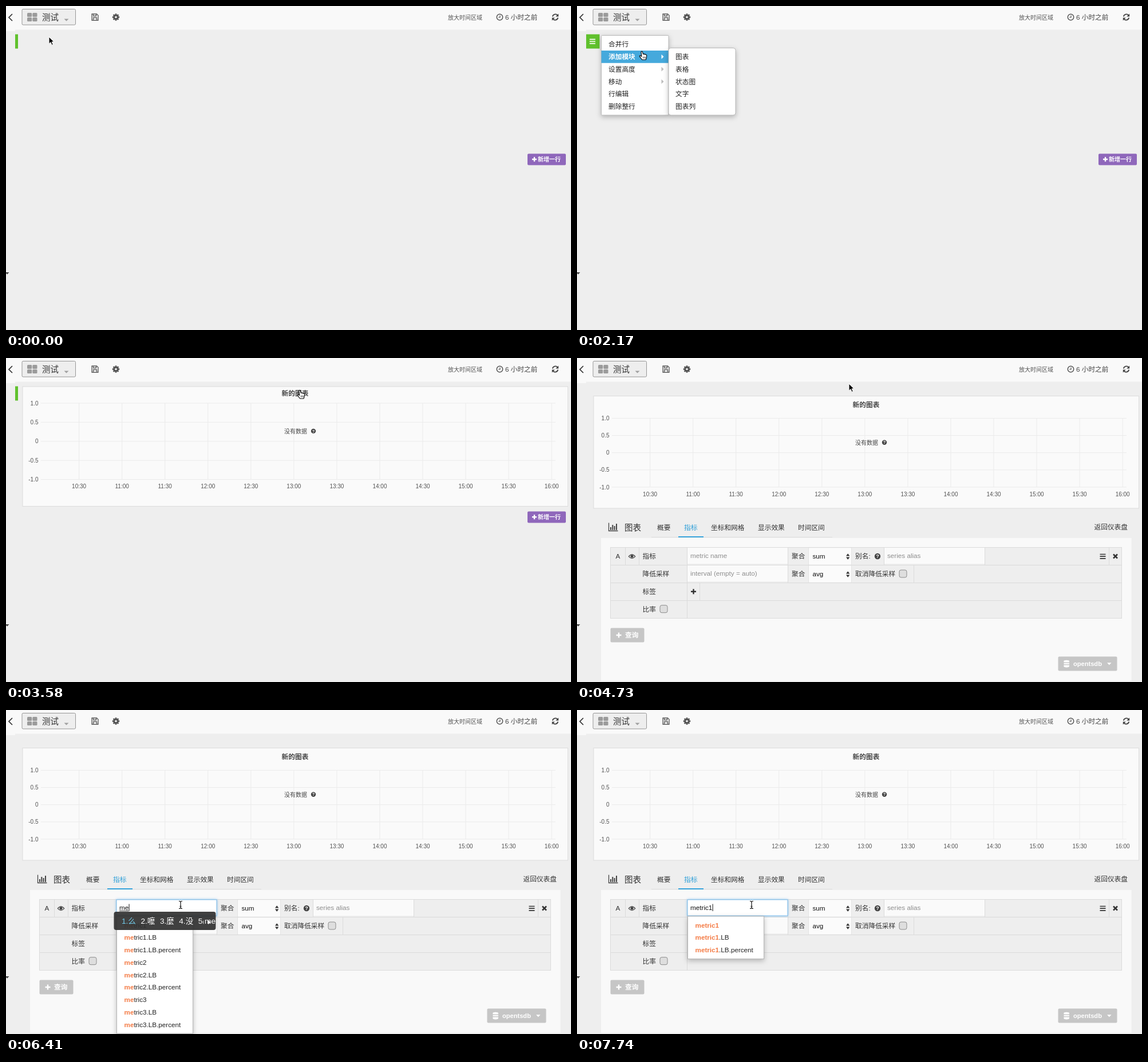
These frames come from a looping animation (987 px wide and 567 px high, 8 s). An HTML page:

```html
<!DOCTYPE html>
<html lang="zh-CN">
<head>
<meta charset="utf-8">
<title>Dashboard</title>
<style>
html, body { margin: 0; width: 100%; height: 100%; overflow: hidden; background: #eee; }
svg { display: block; width: 100%; height: 100%; }
text { font: 11.7px "Liberation Sans", "Noto Sans CJK SC", "Noto Sans CJK", sans-serif; fill: #333; white-space: pre; }
.pop { filter: drop-shadow(0 3px 4px rgba(0, 0, 0, .25)); }
</style>
</head>
<body>
<svg id="stage" viewBox="0 0 987 567"></svg>
<script>
const LOOP = 8000, ROW = 21.75;
const stage = document.getElementById('stage');

// Markup helpers
const rect = (x, y, w, h, fill, extra = '') =>
  `<rect x="${x}" y="${y}" width="${w}" height="${h}" fill="${fill}" ${extra}/>`;
const text = (x, y, s, style = '', extra = '') =>
  `<text x="${x}" y="${y}" style="${style}" ${extra}>${s}</text>`;
const path = (d, fill, extra = '') => `<path d="${d}" fill="${fill}" ${extra}/>`;
const line = (d, stroke, w = 1, extra = '') =>
  path(d, 'none', `stroke="${stroke}" stroke-width="${w}" ${extra}`);
const group = (id, body, extra = '') => `<g id="${id}" ${extra}>${body}</g>`;
const at = (x, y, body) => `<g transform="translate(${x} ${y})">${body}</g>`;
const plus = (x, y, color, r = 4) =>
  line(`M${x - r} ${y}h${2 * r}M${x} ${y - r}v${2 * r}`, color, 2.4);
const bars = (x, y, w, color) =>
  line(`M${x} ${y}h${w}m${-w} 3.7h${w}m${-w} 3.7h${w}`, color, 1.7);
const help = (x, y, r) => `<circle cx="${x}" cy="${y}" r="${r}" fill="#444"/>` +
  text(x, y + r * .62, '?', `font-size:${r * 1.75}px;font-weight:bold;fill:#fff`, 'text-anchor="middle"');
const box = (x, y) => rect(x, y, 13, 13, '#dedede', 'rx="3" stroke="#8c8c8c"');

function header() {
  const teeth = [...Array(8)].map((_, i) =>
    rect(-1.4, -6.2, 2.8, 4, '#555', `transform="rotate(${i * 45})"`)).join('');
  const tiles = [0, 1, 2, 3].map(i =>
    rect(37 + i % 2 * 9.3, 12 + (i >> 1) * 8, 8.2, 7, '#9b9b9b', 'rx="1.5"')).join('');
  return rect(0, 0, 987, 41.5, '#f9f9f9') + rect(0, 0, 16, 44, '#f9f9f9') +
    line('M11 14L5 20L11 26', '#333', 1.7) +
    rect(28, 5.5, 93.5, 27.5, '#eee', 'rx="2" stroke="#969696"') + tiles +
    text(63, 25, '测试', 'font-size:14.5px;font-weight:500') +
    path('M101.5 22.5h8l-4 4z', '#a0a0a0') +
    line('M150 14h8.5l2.5 2.5v8.5h-11zM152.5 14v3.5h5v-3.5M152.5 25v-4.5h6v4.5', '#555', 1.3) +
    at(192, 19.5, teeth + '<circle r="3.2" fill="none" stroke="#555" stroke-width="2.8"/>') +
    text(772, 23.5, '放大时间区域', 'font-size:10px;fill:#555') +
    '<circle cx="862.5" cy="19.5" r="5.2" fill="none" stroke="#555" stroke-width="1.5"/>' +
    line('M863 16.5v3.5h-2.8', '#555', 1.2) +
    text(872, 24, '6 小时之前', 'fill:#444') +
    line('M954.8 18.5a5 5 0 0 1 8.7-2.3M964.2 20.5a5 5 0 0 1-8.7 2.3', '#444', 1.8) +
    path('M965.2 13.5v5h-5zM953.8 25.5v-5h5z', '#444') +
    path('M-1 466h6.5l-3.5 3.8z', '#444');
}

function chart(id, top, bottom, titleY, gridY, step, timeY, emptyY) {
  let s = rect(29, top, 952.5, bottom - top, '#fafafa', 'class="panel" stroke="#dcdcdc"');
  s += text(505, titleY, '新的图表', 'font-weight:bold;fill:#444', 'text-anchor="middle"');
  ['1.0', '0.5', '0', '-0.5', '-1.0'].forEach((v, i) => {
    const y = gridY + i * step;
    s += line(`M61 ${y}H960`, '#ebebeb') +
      text(56.5, y + 3.6, v, 'font-size:10px;fill:#545454', 'text-anchor="end"');
  });
  for (let i = 0; i < 12; i++) {
    const x = 127.6 + i * 75.05, min = 630 + i * 30;
    s += line(`M${x} ${gridY}v${step * 4}`, '#ebebeb') +
      text(x, timeY, `${Math.floor(min / 60)}:${min % 60 ? '30' : '00'}`, 'font-size:10px;fill:#545454', 'text-anchor="middle"');
  }
  s += text(486, emptyY, '没有数据', 'font-size:10px;fill:#444') + help(537, emptyY - 3.7, 4.2);
  return group(id, s);
}

function menu(x, y, w, h, tx, items, cls, rx) {
  return rect(x, y, w, h, '#fff', `rx="${rx}" stroke="#b9b9b9" class="pop"`) +
    items.map((s, i) => {
      const arrow = cls === 'item' && i > 0 && i < 4;
      return `<g class="${cls}">` + rect(x, 78 + (i - (cls === 'item')) * ROW, w, ROW, 'none') +
        text(tx, 93 + (i - (cls === 'item')) * ROW, s) +
        (arrow ? path(`M147.5 ${84.7 + (i - 1) * ROW}l4 4l-4 4z`, '#bbb', 'class="arrow"') : '') + '</g>';
    }).join('');
}

function panelMenu() {
  const names = ['查看', '编辑', '复制', '分享'];
  return rect(424, 5, 162, 51, '#fbfbfb', 'stroke="#d0d0d0" class="pop"') +
    line('M424 30.5h162', '#ddd') +
    line('M440 18h9M472 18h9m-4.5-4.5v9M529 14l7 8m0-8l-7 8', '#555', 1.8) + bars(560, 14.3, 10, '#555') +
    names.map((s, i) => rect(425 + i * 40.3, 31, 39, 25, 'none', 'class="act"') +
      text(444.5 + i * 40.3, 47.5, s, '', 'text-anchor="middle"')).join('');
}

function editor() {
  const tabs = [['概要', 140], ['指标', 187], ['坐标和网格', 234], ['显示效果', 316], ['时间区间', 386]];
  const input = (x, y, s, id = '') => rect(x, y, 175, 28, '#fafafa', id && `id="${id}"`) +
    text(x + 5, y + 17.5, s, 'fill:#8e8e8e', id && 'id="hint"');
  const select = (y, s) => rect(405, y, 74, 29, '#fbfbfb') + text(411.5, y + 18.5, s, 'fill:#111') +
    path(`M470 ${y + 14}h6.4l-3.2-4.3zM470 ${y + 16}h6.4l-3.2 4.3z`, '#333');
  const button = (x, y, w) => rect(x, y, w, 25, '#c6c6c6', 'rx="2"');
  return line('M55.5 288.5V302.5H71.5', '#444', 1.3) +
    line('M59 301v-5M62.3 301v-9M65.6 301v-7M69 301v-11', '#444', 2) +
    text(83, 302, '图表', 'font-size:14.5px') +
    tabs.map(([s, x], i) => text(x, 301, s, i === 1 ? 'fill:#2f9fd8' : '')).join('') +
    line('M130 313.5H446', '#ddd') + rect(177, 312, 44, 2, '#38a4dc') +
    text(903.5, 300, '返回仪表盘') +
    rect(42, 315, 926.5, 250, '#f9f9f9') +
    rect(58.5, 331.5, 893, 124, '#eee', 'stroke="#dbdbdb"') +
    line('M59 362.5H951M59 393.5H951M59 424.5H951M192.5 332V455M84.5 332v30M108.5 332v30' +
      'M368.5 332v61M405 332v61M479 332v61M536.5 332v30M712.5 332v30M929.5 332v30M588.5 363v30M214.5 394v30', '#dbdbdb') +
    text(67.5, 351, 'A') +
    line('M90.3 347.3q5.7-7 11.4 0q-5.7 6.5-11.4 0z', '#444', 1.2) + '<circle cx="96" cy="347" r="2.5" fill="#444"/>' +
    ['指标', '降低采样', '标签', '比率'].map((s, i) => text(114.5, 351.3 + i * 31, s)).join('') +
    input(193, 332, 'metric name', 'field') + input(193, 363, 'interval (empty = auto)') + input(537, 332, 'series alias') +
    text(375, 351.3, '聚合') + text(375, 382.3, '聚合') + select(332.5, 'sum') + select(363.5, 'avg') +
    text(486, 351.3, '别名:') + help(525, 347, 5.2) +
    text(486, 382.3, '取消降低采样') + box(563, 371) + box(145, 432.7) +
    bars(913.5, 343.5, 10, '#333') + line('M937 343.5l7 7m0-7l-7 7', '#333', 2.5) +
    plus(203.5, 408.8, '#333', 4.5) +
    button(58.5, 472.5, 59) + plus(73, 485, '#fff', 4.5) + text(84, 489.3, '查询', 'fill:#fff;font-weight:bold') +
    button(840.5, 522.5, 103) +
    line('M850.5 531.5h9.5M850.5 535h9.5M850.5 538.5h9.5', '#fff', 2.2) +
    '<ellipse cx="855.2" cy="530.5" rx="4.8" ry="1.8" fill="#fff"/><ellipse cx="855.2" cy="539.6" rx="4.8" ry="1.8" fill="#fff"/>' +
    text(867, 539, 'opentsdb', 'fill:#fff;font-weight:bold;font-size:11.1px') +
    path('M926 533.3h7.5l-3.7 4z', '#fff');
}

const cursors = {
  arrow: path('M0 0V12.3L3 9.6L5.1 14.4L7.3 13.4L5.2 8.8H9Z', '#000', 'stroke="#fff"'),
  hand: path('M-1.2 1Q0-.6 1.2 1L2.2 5.2Q3.6 4.2 4.6 5.6Q6.2 4.8 7 6.3Q8.6 6 8.6 8L8 12L7 15H0.6L-3.6 9.6Q-4.6 7.6-2.8 7.8L-.4 9.4Z',
    '#fff', 'stroke="#000" stroke-width="1.1" stroke-linejoin="round"') + line('M2.4 9.6v3M4.3 9.6v3M6.2 9.6v3', '#000', .7),
  beam: line('M-3-6.5Q0-6.5 0-4.5Q0-6.5 3-6.5M0-5V5M-3 6.5Q0 6.5 0 4.5Q0 6.5 3 6.5M-1.5 2.5h3', '#111', 1.2)
};

stage.innerHTML = rect(0, 0, 987, 567, '#eee') + header() +
  group('tab', rect(16, 49.5, 5, 25, '#60c12d', 'id="green"') + group('burger', bars(22, 58.3, 10, '#fff'))) +
  group('add', rect(911, 0, 67, 20, '#8f67bb', 'rx="2"') + plus(923, 9.7, '#fff') +
    text(929, 13.5, '新增一行', 'font-size:10px;font-weight:bold;fill:#fff')) +
  chart('small', 50, 259.5, 66.2, 79, 33.4, 228.4, 131.6) +
  chart('large', 66.5, 263, 86.2, 105.5, 30.1, 242, 151.5) +
  group('editor', editor()) +
  group('rowMenu', menu(42.5, 51.5, 117.5, 139.5, 55, ['合并行', '添加模块', '设置高度', '移动', '行编辑', '删除整行'], 'item', 1)) +
  group('subMenu', menu(160, 73.5, 117, 117.5, 172, ['图表', '表格', '状态图', '文字', '图表列'], 'sub', 4)) +
  group('panelMenu', panelMenu()) +
  group('list', '') + group('typed', '') + group('ime', '') + group('cursor', '');

const $ = id => document.getElementById(id);
const show = (id, on) => { $(id).style.display = on ? '' : 'none'; };

// The screen refreshes only in these bursts: first, last, count
const bursts = [[0, 0, 1], [720, 720, 1], [860, 1380, 7], [1640, 1640, 1], [1820, 2610, 10], [2960, 3580, 8],
  [3930, 3930, 1], [4110, 4380, 4], [4730, 4820, 2], [4970, 5150, 3], [5420, 5600, 3], [5870, 6050, 3],
  [6230, 7020, 10], [7200, 7290, 2], [7650, 7740, 2]];

function snap(t) {
  t += 4;
  const [a, b, n] = bursts.findLast(s => s[0] <= t);
  if (n === 1) return a;
  const step = (b - a) / (n - 1);
  return a + Math.min(n - 1, Math.floor((t - a) / step)) * step;
}

const track = [[0, 75, 54], [720, 60, 56], [1120, 18, 59], [1380, 26, 61], [1640, 26, 61], [1820, 50, 72],
  [2170, 113, 79], [2610, 182, 84], [2960, 190, 86], [3580, 513, 56], [3930, 513, 56], [4200, 485, 35],
  [4380, 476, 45], [4730, 475, 45], [4820, 378, 268], [5150, 305, 368], [5420, 305, 361], [5600, 305, 341]];
const shapes = [[0, 'arrow'], [1030, 'hand'], [2950, 'arrow'], [3480, 'hand'], [4720, 'arrow'], [5050, 'beam']];
const keys = [6230, 6400, 6575, 6660, 6750, 6925, 7640];
const words = ['没 吗 么 嘛 们', '么 嚒 麼 没 me', '么他 met 么特 么 麼', '么头 metr 么 麼 嚒', 'metric 么提 met 么 麼', 'metric 么提出 met 么 麼'];

const last = (list, t) => list.findLast(k => k[0] <= t);

function pointer(t) {
  const i = track.findLastIndex(k => k[0] <= t), a = track[i], b = track[i + 1] || a;
  const f = b === a ? 0 : (t - a[0]) / (b[0] - a[0]);
  return [a[1] + (b[1] - a[1]) * f, a[2] + (b[2] - a[2]) * f];
}

function highlight(cls, index) {
  stage.querySelectorAll('.' + cls).forEach((g, i) => {
    const on = i === index, label = g.querySelector('text'), arrow = g.querySelector('.arrow');
    g.firstChild.setAttribute('fill', on ? '#45a9dc' : 'none');
    label.style.fill = on ? '#fff' : '#222';
    label.style.fontWeight = on ? 'bold' : 'normal';
    if (arrow) arrow.setAttribute('fill', on ? '#fff' : '#bbb');
  });
}

function suggestions(word) {
  const all = word
    ? ['metric1', 'metric2', 'metric3'].flatMap(m => ['', '.LB', '.LB.percent'].map(e => m + e)).filter(s => s.startsWith(word))
    : ['SystemHealth', ...['batchCount', 'byteSize', 'runningTime', 'state'].map(s => 'collector.' + s),
      ...['idle', 'irq', 'nice', 'state', 'user'].map(s => 'cpu.' + s)];
  const w = word ? 133 : 226, h = 9.3 + all.length * ROW;
  return rect(193.5, 361, w, h, '#fff', 'stroke="#b5b5b5" class="pop"') +
    all.map((s, i) => text(206.5, 380.7 + i * ROW,
      `<tspan style="font-weight:bold;fill:#f47b45">${word}</tspan>${s.slice(word.length)}`, 'fill:#222')).join('') +
    (word ? '' : rect(412.5, 361.5, 6.5, 42, '#fafafa', 'stroke="#8c8c8c"'));
}

function drawTyped(word, composing, focused) {
  if (!focused) return $('typed').innerHTML = '';
  $('typed').innerHTML = text(198, 349.8, word, 'fill:#111');
  const w = word ? $('typed').firstChild.getComputedTextLength() : 0;
  $('typed').innerHTML += line(`M${198.8 + w} 339.5v12.5`, '#111') +
    (composing ? line(`M198 351.7h${w}`, '#222') : '');
}

function drawIme(n) {
  if (!n) return $('ime').innerHTML = '';
  const spans = words[n - 1].split(' ').map((s, i) =>
    `<tspan dx="${i ? 8.5 : 0}" fill="${i ? '#fff' : '#72cbea'}" style="fill:${i ? '#fff' : '#72cbea'}">${i + 1}.${s}</tspan>`).join('');
  $('ime').innerHTML = text(202, 374, spans, 'font-size:13.6px');
  const w = $('ime').firstChild.getComputedTextLength(), x = 202 + w;
  $('ime').innerHTML = rect(188.5, 353, w + 48, 32, 'rgba(48,48,48,.92)', 'rx="4"') + $('ime').innerHTML +
    path(`M${x + 14} 368v7l-5-3.5z`, '#888') + path(`M${x + 21} 368v7l5-3.5z`, '#fff');
}

function draw(t) {
  const [x, y] = pointer(t);
  const editing = t >= 4730, panel = t >= 2960, menuOn = t >= 1640 && !panel;
  const open = t >= 1030 && !panel;

  show('tab', !editing);
  $('green').setAttribute('width', open ? 23.5 : 5);
  show('burger', open);
  show('add', !editing);
  $('add').setAttribute('transform', `translate(0 ${panel ? 268.5 : 258.5})`);
  show('small', panel && !editing);
  show('large', editing);
  show('editor', editing);

  const hover = x < 42 ? -1 : x > 160 ? 1 : Math.floor((y - 56.25) / ROW);
  show('rowMenu', menuOn);
  show('subMenu', menuOn && hover === 1);
  highlight('item', hover);
  highlight('sub', x > 160 ? Math.floor((y - 78) / ROW) : -1);

  const acting = t >= 3930 && !editing;
  show('panelMenu', acting);
  stage.querySelector('#small .panel').style.filter = acting ? 'drop-shadow(0 0 2px rgba(82,168,236,.8))' : '';
  stage.querySelectorAll('.act').forEach((r, i) =>
    r.setAttribute('fill', i === Math.floor((x - 425) / 40.3) && y > 31 && y < 56 ? '#e6e6e6' : 'none'));

  const focused = t >= 5870, word = 'metric1'.slice(0, keys.filter(k => k <= t).length);
  const composing = word && t < 7200, field = $('field');
  field.setAttribute('fill', focused ? '#fff' : '#fafafa');
  field.setAttribute('stroke', focused ? '#7dbdec' : 'none');
  field.style.filter = focused ? 'drop-shadow(0 0 2px rgba(82,168,236,.6))' : '';
  show('hint', !word);
  $('list').innerHTML = t >= 5950 ? suggestions(word) : '';
  drawTyped(word, composing, focused);
  drawIme(composing ? word.length : 0);

  $('cursor').innerHTML = cursors[last(shapes, t)[1]];
  $('cursor').setAttribute('transform', `translate(${x} ${y})`);
}

let shown = -1;
const start = performance.now();
function tick() {
  const t = snap((performance.now() - start) % LOOP);
  if (t !== shown) draw(shown = t);
  requestAnimationFrame(tick);
}
tick();
</script>
</body>
</html>
```
